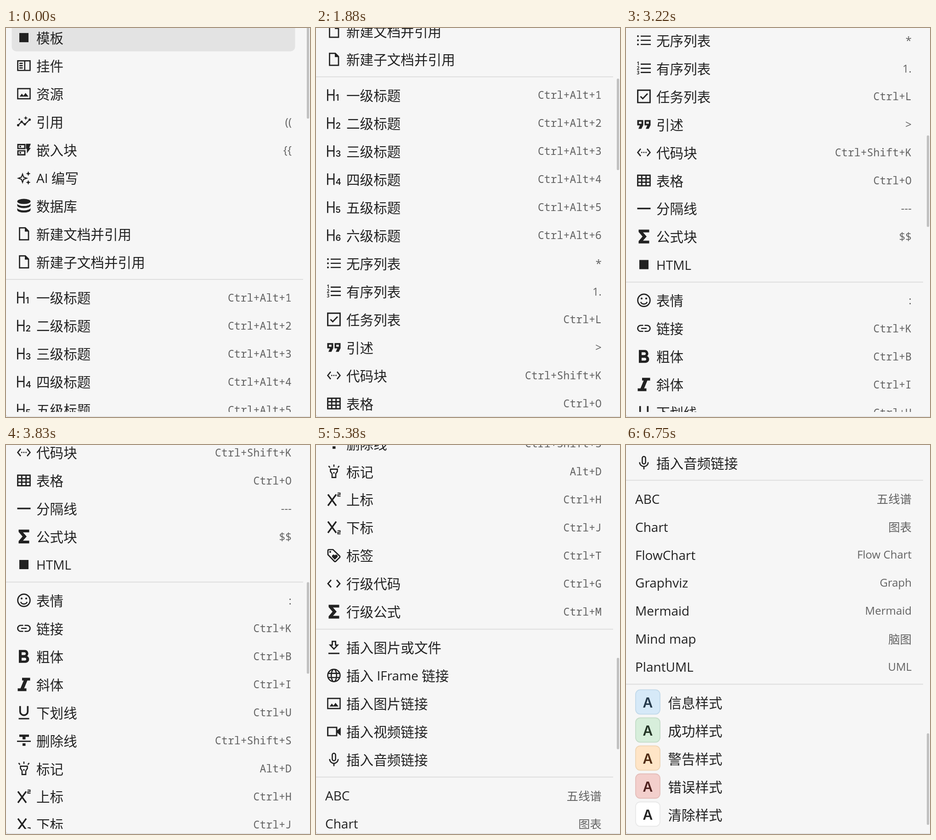
Write an HTML page with a canvas that moves like this. It is 662 by 846 pixels and loops after 6820 ms.

```html
<!DOCTYPE html>
<html lang="zh-CN">
<head>
<meta charset="utf-8">
<title>菜单</title>
<style>
html, body { margin: 0; width: 100%; height: 100%; overflow: hidden; background: #f6f6f6; }
canvas { display: block; width: 662px; height: 846px; }
</style>
</head>
<body>
<canvas id="stage" width="662" height="846"></canvas>
<script>
const ctx = document.getElementById('stage').getContext('2d');
const LOOP = 6820, VIEW = 835, PITCH = 60.97, GAP = 16.8, FIRST = 22.3;
const INK = '#222', MUTED = '#626262', BG = '#f6f6f6';
const SANS = '"Open Sans", "Noto Sans", sans-serif';
const CJK = '"Noto Sans CJK SC", "Noto Sans CJK", sans-serif';
const MONO = '"Noto Sans Mono", monospace';
const BADGE = 'Inter, sans-serif';

// Path helpers; icons are drawn around their own centre.
const dot = (x, y, r, ry = r) => `M${x - r} ${y}a${r} ${ry} 0 1 0 ${2 * r} 0a${r} ${ry} 0 1 0 ${-2 * r} 0z`;
const box = (x, y, w, h) => `M${x} ${y}h${w}v${h}h${-w}z`;
const star = (x, y, r, k = 0.28) => {
  const q = r * k;
  return `M${x} ${y - r}l${q} ${r - q} ${r - q} ${q} ${q - r} ${q} ${-q} ${r - q} ${-q} ${q - r} ${q - r} ${-q} ${r - q} ${-q}z`;
};
const band = y => `M-14.5 ${y}c0 3 6 5.6 14.5 5.6s14.5-2.6 14.5-5.6v4.6c0 3-6 5.6-14.5 5.6s-14.5-2.6-14.5-5.6z`;
const quote = x => `M${x} -9.5h13v11l-4 8h-6.5l3.5-7.5h-6zM${x + 3.6} -6v4.5h5.6v-4.5z`;
const two = y => `M8 ${y}h5.5v3.3h-5v3.4h6`;

const fill = path => ({ path: new Path2D(path) });
const line = (path, width = 2.7) => ({ path: new Path2D(path), width });
const glyph = (text, x, y, font) => ({ text, x, y, font });

const picture = [line(box(-13.5, -11, 27, 22), 2.6), fill('M-9.5 6.5l5-6.5 3.5 4.5 4.5-6 6.5 8z')];
const page = [line('M-9.5 -13H3L10 -6V13H-9.5Z'), fill('M2 -13.5v8.5h8.5z')];
const sigma = [fill('M-11.5 -15H11.5V-9H-2L6 0L-2 9H11.5V15H-11.5V10L-3 0L-11.5 -10Z')];
const bars = line('M-7 -9H15M-7 0H15M-7 9H15');

const icons = {
  square: [fill(box(-10, -10, 20, 20))],
  widget: [line(box(-13.4, -10.4, 26.8, 20.8)), line('M1.8 -10V10M-10 -5H-2.5M-10 0H-2.5M-10 5H-2.5', 2.6)],
  picture, page, sigma,
  chart: [
    line('M-13 8L-5 0L2 6L13 -5', 2.3),
    fill(dot(-12.5, 7.5, 2.6) + dot(-5, 0, 2.6) + dot(2, 5.5, 2.6) + dot(12.5, -4.5, 2.6) + star(4, -8, 4.5) + star(-10, -5, 3))
  ],
  embed: [
    line(box(-13, -11.3, 15, 8.6) + box(-13, 2.3, 15, 8.6), 2.9),
    fill(box(-9.5, -8.6, 3.4, 3.2) + box(-9.5, 5, 3.4, 3.2) + 'M4.5 -13H15L11.5 -4H15L6.5 8V-2H4.5Z')
  ],
  spark: [line(star(-3, 1, 9, 0.26), 2.2), fill(star(9.5, -9, 5.2) + star(9.5, 10, 5.2))],
  data: [fill(dot(0, -9.5, 14.5, 5.6) + band(-5.2) + band(4.4))],
  ul: [bars, fill(dot(-13, -9, 2) + dot(-13, 0, 2) + dot(-13, 9, 2))],
  ol: [bars, ...[1, 2, 3].map(n => glyph(n, -15.5, n * 10 - 16.5, `700 10px ${SANS}`))],
  task: [line(box(-13.4, -13.4, 26.8, 26.8), 2.9), line('M-7.5 0L-2.5 5L8 -6', 2.9)],
  quote: [fill(quote(-14.5) + quote(1.5))],
  codeBlock: [line('M-7 -8L-13.5 0L-7 8M7 -8L13.5 0L7 8', 2.5), fill(dot(-4.6, 0, 1.4) + dot(0, 0, 1.4) + dot(4.6, 0, 1.4))],
  table: [line(box(-13.4, -11.4, 26.8, 22.8) + 'M-4.7 -11V11M4.7 -11V11M-13 -3.8H13M-13 3.8H13', 2.9)],
  rule: [line('M-14.5 0H14.5', 3.4)],
  smile: [line(dot(0, 0, 13.4)), fill(dot(-5, -4, 2.1) + dot(5, -4, 2.1)), line('M-7 3.5a7.6 7.6 0 0 0 14 0', 2.6)],
  link: [line('M-1.5 -6.5H-7a6.5 6.5 0 0 0 0 13H-1.5M1.5 -6.5H7a6.5 6.5 0 0 1 0 13H1.5M-6 0H6')],
  bold: [fill('M-11 -14H2a7.6 7.6 0 0 1 5 13.2A7.8 7.8 0 0 1 3 14H-11ZM-5 -9v6h6a3 3 0 0 0 0-6zM-5 3v6h7a3 3 0 0 0 0-6z')],
  italic: [fill('M-4 -14.5H13.5V-8.5H7.5L.5 8.5H5.5v6H-13.5v-6h6L-.5 -8.5H-4z')],
  under: [line('M-8.3 -14V-2a8.3 8 0 0 0 16.6 0V-14', 3.6), line('M-11.5 13.5H11.5', 3)],
  strike: [fill('M-10 -13H11V-8H3.5V-2.5H-3V-8H-10Z' + box(-15, 0.3, 30, 2.9) + box(-3, 6, 6.5, 5.5))],
  torch: [
    line('M-7.5 -5H7.5V0L4 5V13H-4V5L-7.5 0Z', 2.6),
    line('M0 -15v5M-11.5 -12l3 3.5M11.5 -12l-3 3.5', 2.5), fill(dot(0, 3, 1.8))
  ],
  sup: [line('M-13 -11L5 13.5M5 -11L-13 13.5', 3.4), line(two(-14), 1.9)],
  sub: [line('M-13 -13L5 11.5M5 -13L-13 11.5', 3.4), line(two(7), 1.9)],
  tag: [
    line('M-13 -2V-11a2 2 0 0 1 2-2H-2L12.5 1a2 2 0 0 1 0 3L4 12.5a2 2 0 0 1-3 0Z'),
    fill(dot(-8, -8, 2.1) + 'M2 9L-3.5 3.4a3.2 3.2 0 0 1 5.5-4a3.2 3.2 0 0 1 5.5 4Z')
  ],
  code: [line('M-6 -8L-13 0L-6 8M6 -8L13 0L6 8', 2.8)],
  down: [line('M-3.6 -13H3.6V-5H8L0 3.5L-8 -5H-3.6Z', 2.8), line('M-12 13H12', 3)],
  globe: [line(dot(0, 0, 13.4) + dot(0, 0, 5.8, 13.4) + 'M-12.5 -4.6H12.5M-12.5 4.6H12.5', 2.6)],
  video: [line(box(-13.4, -9, 19.4, 18), 2.9), fill('M6.5 -2L14.8 -9V9L6.5 2z')],
  mic: [line('M-3.6 -10a3.6 3.6 0 0 1 7.2 0v9a3.6 3.6 0 0 1-7.2 0z', 2.6), line('M-9.3 -1a9.3 9.3 0 0 0 18.6 0M0 8.5V14.5', 2.6)]
};
for (let n = 1; n <= 6; n++) {
  icons['h' + n] = [line('M-13.6 -12.7V12.5M0 -12.7V12.5M-13.6 -.8H0', 2.7), glyph(n, 3.6, 12.5, `600 18.5px ${BADGE}`)];
}

const chip = (bg, edge, ink) => ({ bg, edge, ink });
const groups = [
  [
    ['square', '模板'], ['widget', '挂件'], ['picture', '资源'], ['chart', '引用', '(('], ['embed', '嵌入块', '{{'],
    ['spark', 'AI 编写'], ['data', '数据库'], ['page', '新建文档并引用'], ['page', '新建子文档并引用']
  ],
  [
    ...[...'一二三四五六'].map((c, i) => ['h' + (i + 1), c + '级标题', 'Ctrl+Alt+' + (i + 1)]),
    ['ul', '无序列表', '*'], ['ol', '有序列表', '1.'], ['task', '任务列表', 'Ctrl+L'], ['quote', '引述', '>'],
    ['codeBlock', '代码块', 'Ctrl+Shift+K'], ['table', '表格', 'Ctrl+O'], ['rule', '分隔线', '---'],
    ['sigma', '公式块', '$$'], ['square', 'HTML']
  ],
  [
    ['smile', '表情', ':'], ['link', '链接', 'Ctrl+K'], ['bold', '粗体', 'Ctrl+B'], ['italic', '斜体', 'Ctrl+I'],
    ['under', '下划线', 'Ctrl+U'], ['strike', '删除线', 'Ctrl+Shift+S'], ['torch', '标记', 'Alt+D'],
    ['sup', '上标', 'Ctrl+H'], ['sub', '下标', 'Ctrl+J'], ['tag', '标签', 'Ctrl+T'],
    ['code', '行级代码', 'Ctrl+G'], ['sigma', '行级公式', 'Ctrl+M']
  ],
  [
    ['down', '插入图片或文件'], ['globe', '插入 IFrame 链接'], ['picture', '插入图片链接'],
    ['video', '插入视频链接'], ['mic', '插入音频链接']
  ],
  [
    ['', 'ABC', '五线谱'], ['', 'Chart', '图表'], ['', 'FlowChart', 'Flow Chart'], ['', 'Graphviz', 'Graph'],
    ['', 'Mermaid', 'Mermaid'], ['', 'Mind map', '脑图'], ['', 'PlantUML', 'UML']
  ],
  [
    [chip('#d6e9f8', '#c1d9ea', '#24384a'), '信息样式'], [chip('#d7eedb', '#c4dcc8', '#223325'), '成功样式'],
    [chip('#ffe5c7', '#eed4b3', '#4f2a10'), '警告样式'], [chip('#f3cfcc', '#e4bdb9', '#4f211e'), '错误样式'],
    [chip('#ffffff', '#e8e8e8', '#222222'), '清除样式']
  ]
];

const knots = [
  [0, 0], [1, 18], [2, 66], [3, 98], [11, 98], [12, 116], [13, 164], [14, 196], [18, 196], [28, 440.5],
  [48, 925.5], [66, 1434.5], [72, 1614.5], [73, 1614.5], [80, 1826], [100, 2471.5]
];

function tickAt(t) {
  const n = t < 1260 ? (t + 7) * 0.015 : 19 + (t - 1244) / 67.8;
  return Math.min(100, Math.floor(n));
}

function scrollAt(tick) {
  const i = Math.max(1, knots.findIndex(k => k[0] >= tick));
  const [a, from] = knots[i - 1], [b, to] = knots[i];
  return from + (to - from) * (tick - a) / (b - a);
}

const isLatin = text => text < '\x7f';

function drawIcon(parts, x, y) {
  ctx.save();
  ctx.translate(x, y);
  ctx.fillStyle = ctx.strokeStyle = INK;
  for (const p of parts) {
    if (p.font) {
      ctx.font = p.font;
      ctx.fillText(p.text, p.x, p.y);
    } else if (p.width) {
      ctx.lineWidth = p.width;
      ctx.stroke(p.path);
    } else {
      ctx.fill(p.path, 'evenodd');
    }
  }
  ctx.restore();
}

function drawLabel(text, x, y) {
  ctx.fillStyle = INK;
  for (const run of text.match(/[ -~]+|[^ -~]+/g)) {
    const latin = isLatin(run);
    ctx.font = latin ? `28px ${SANS}` : `29.6px ${CJK}`;
    ctx.fillText(run, x, y + (latin ? 9.8 : 10.5));
    x += ctx.measureText(run).width;
  }
}

function drawHint(text, y) {
  const mono = /Ctrl|Alt/.test(text), latin = isLatin(text);
  ctx.font = mono ? `23.2px ${MONO}` : latin ? `24px ${SANS}` : `25.4px ${CJK}`;
  ctx.fillStyle = MUTED;
  ctx.textAlign = 'right';
  ctx.fillText(text, 622, y + (mono ? 7 : latin ? 7.4 : 9.3));
  ctx.textAlign = 'left';
}

function roundBox(x, y, w, h, r, color) {
  ctx.beginPath();
  ctx.roundRect(x, y, w, h, r);
  ctx.fillStyle = color;
  ctx.fill();
}

function drawChip({ bg, edge, ink }, y) {
  roundBox(21, y - 29, 53, 53, 10, bg);
  ctx.strokeStyle = edge;
  ctx.lineWidth = 1.8;
  ctx.stroke();
  ctx.font = `600 30px ${BADGE}`;
  ctx.fillStyle = ink;
  ctx.textAlign = 'center';
  ctx.fillText('A', 47.5, y + 10);
  ctx.textAlign = 'left';
}

function drawRow([icon, label, hint], y) {
  if (icon.bg) drawChip(icon, y);
  else if (icon) drawIcon(icons[icon], 39, y - 1.4);
  drawLabel(label, icon.bg ? 91.5 : icon ? 66 : 20, y);
  if (hint) drawHint(hint, y);
}

function draw(t) {
  const scroll = scrollAt(tickAt(t));
  ctx.fillStyle = BG;
  ctx.fillRect(0, 0, 662, 846);
  ctx.strokeStyle = '#d9d9d9';
  ctx.lineWidth = 1.2;
  ctx.stroke(new Path2D('M0 841.5Q1 845.3 5 845.3H662'));

  ctx.save();
  ctx.beginPath();
  ctx.rect(0, 0, 662, VIEW);
  ctx.clip();
  roundBox(12.5, -8 - scroll, 617, 58.7, 10, '#e3e3e3');
  let y = FIRST - scroll;
  groups.forEach((rows, i) => {
    if (i) {
      ctx.fillStyle = '#dcdcdc';
      ctx.fillRect(0, y - PITCH + 35.8, 647, 1.8);
      y += GAP;
    }
    for (const row of rows) {
      if (y > -50 && y < VIEW + 50) drawRow(row, y);
      y += PITCH;
    }
  });
  roundBox(655, -2 + scroll * 0.2545, 5.2, 199, 2.6, '#c1c1c1');
  ctx.restore();
}

function loop() {
  draw(performance.now() % LOOP);
  requestAnimationFrame(loop);
}
loop();
</script>
</body>
</html>
```
